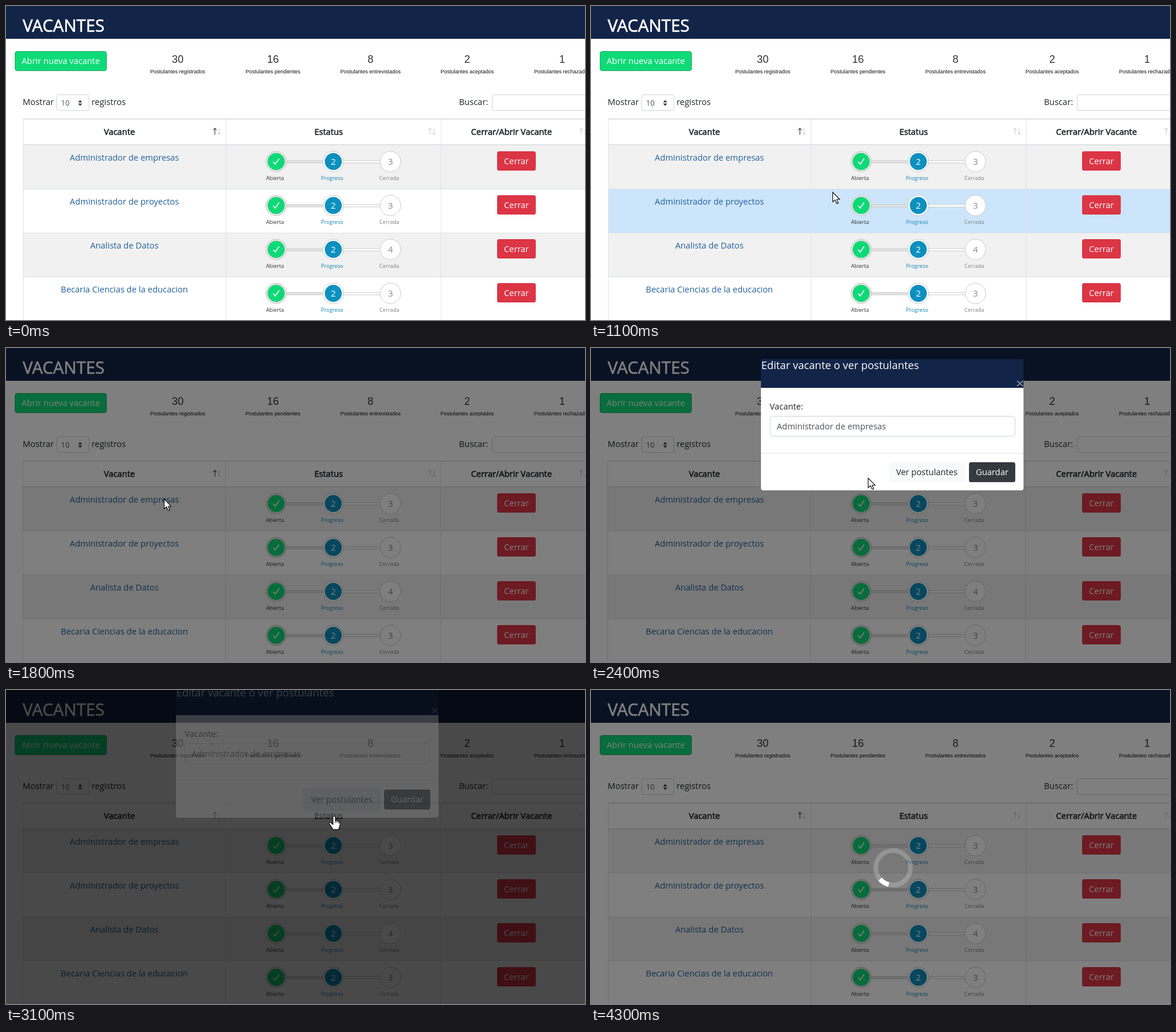
Write an HTML page with a canvas that moves like this. It is 988x536 px and loops after 4.4 s.

```html
<!DOCTYPE html>
<html lang="es">
<head>
<meta charset="utf-8">
<title>Vacantes</title>
<style>
  html, body { margin: 0; width: 100%; height: 100%; overflow: hidden; background: #fff; }
  canvas { display: block; }
</style>
</head>
<body>
<canvas id="stage" width="988" height="536"></canvas>
<script>
const W = 988, H = 536, LOOP = 4400, STEP = 100;
const ctx = document.getElementById('stage').getContext('2d');
const SANS = '"Open Sans", "Noto Sans", sans-serif';
const ARIAL = '"Liberation Sans", Arial, sans-serif';
const NAVY = '#122447', INK = '#212529', LINE = '#dee2e6', FIELD = '#ced4da';

const stats = [
  [293, '30', 'registrados'], [455.5, '16', 'pendientes'], [622, '8', 'entrevistados'],
  [787, '2', 'aceptados'], [949, '1', 'rechazados']
];
const jobs = ['Administrador de empresas', 'Administrador de proyectos',
  'Analista de Datos', 'Becaria Ciencias de la educacion'];

// Pointer path: time, x, y
const path = [[100, 1000, 425], [600, 632, 410], [700, 632, 410], [1400, 270, 258],
  [1850, 270, 258], [2400, 473, 222], [2500, 473, 222], [2900, 560, 215], [3600, 560, 215]];

const clamp = v => Math.max(0, Math.min(1, v));
const ramp = (t, start, length) => clamp((t - start) / length);
const smooth = p => p * p * (3 - 2 * p);

// cubic-bezier(0, 0, .58, 1)
function easeOut(x) {
  let lo = 0, hi = 1;
  for (let i = 0; i < 20; i++) {
    const s = (lo + hi) / 2;
    if (3 * (1 - s) * s * s * 0.58 + s * s * s < x) lo = s; else hi = s;
  }
  return smooth(lo);
}

function rect(x, y, w, h, color) {
  ctx.fillStyle = color;
  ctx.fillRect(x, y, w, h);
}

function box(x, y, w, h, r, fill, border) {
  ctx.beginPath();
  if (border) ctx.roundRect(x + 0.5, y + 0.5, w - 1, h - 1, r);
  else ctx.roundRect(x, y, w, h, r);
  ctx.fillStyle = fill;
  ctx.fill();
  if (border) {
    ctx.strokeStyle = border;
    ctx.lineWidth = 1;
    ctx.stroke();
  }
}

function text(str, x, y, color = INK, size = 14.4, align = 'left', family = SANS, heavy = 0) {
  ctx.font = `${size}px ${family}`;
  ctx.textAlign = align;
  ctx.fillStyle = color;
  ctx.fillText(str, x, y);
  if (heavy) {
    ctx.strokeStyle = color;
    ctx.lineWidth = heavy;
    ctx.strokeText(str, x, y);
  }
}

const centered = (str, x, y, color, size, family, heavy) =>
  text(str, x, y, color, size, 'center', family, heavy);

function poly(points, color, width) {
  ctx.beginPath();
  points.forEach(([x, y]) => ctx.lineTo(x, y));
  ctx.strokeStyle = color;
  ctx.lineWidth = width;
  ctx.stroke();
}

function disc(x, y, r, fill, border) {
  ctx.beginPath();
  ctx.arc(x, y, r, 0, Math.PI * 2);
  ctx.fillStyle = fill;
  ctx.fill();
  if (border) {
    ctx.strokeStyle = border;
    ctx.lineWidth = 1;
    ctx.stroke();
  }
}

function triangle(x, y, h) {
  ctx.beginPath();
  ctx.moveTo(x - 3.5, y);
  ctx.lineTo(x + 3.5, y);
  ctx.lineTo(x, y + h);
  ctx.fillStyle = '#343a40';
  ctx.fill();
}

function sortArrows(x, upColor) {
  const down = '#cfd1d3';
  poly([[x, 208.5], [x, 219.5]], upColor, 1.1);
  poly([[x - 3, 212], [x, 208.5], [x + 3, 212]], upColor, 1.1);
  poly([[x + 7, 209], [x + 7, 219.5]], down, 1.1);
  poly([[x + 4.5, 216.5], [x + 7, 219.5], [x + 9.5, 216.5]], down, 1.1);
}

function steps(y, last) {
  const c = y + 28.5, edge = '#cacaca';
  box(470, c - 2, 80, 5, 0, '#e2e2e2', edge);
  box(566, c - 2, 80, 5, 0, '#fff', edge);

  disc(461, c, 17.5, '#e2e2e2', edge);
  disc(461, c, 14.5, '#0fd977');
  poly([[456, c + 0.5], [459.5, c + 4.5], [466, c - 5]], '#fff', 1.6);

  disc(558.5, c, 17.5, '#fff', edge);
  disc(558.5, c, 14.5, '#0c90bf');
  centered('2', 558.5, c + 5.5, '#fff', 15);

  disc(656, c, 17.5, '#fff', edge);
  centered(last, 656, c + 5.5, '#8a8a8a', 15);

  centered('Abierta', 459, y + 60, '#333', 9.1);
  centered('Progreso', 556.5, y + 60, '#0c83b8', 9.1);
  centered('Cerrada', 654, y + 60, '#808080', 9.1);
}

function drawPage(hover, shift) {
  rect(0, 0, W, H, '#fff');
  rect(0, 0, W, 56, NAVY);
  text('VACANTES', 28.5, 44, '#fff', 28.8, 'left', SANS, 0.7);
  box(15, 77, 157, 34, 3.6, '#0edb78', '#28a760');
  centered('Abrir nueva vacante', 93.5, 99, '#fff');

  stats.forEach(([x, count, label]) => {
    centered(count, x, 97, '#333', 18, ARIAL);
    centered('Postulantes ' + label, x, 115, '#111', 9, ARIAL);
  });

  text('Mostrar', 28.5, 169);
  box(86, 151, 56, 28, 3.6, '#fff', FIELD);
  text('10', 94, 169.5, '#495057', 12.6);
  triangle(126.5, 164.5, -4);
  triangle(126.5, 166.5, 4);
  text('registros', 146, 169);
  text('Buscar:', 773, 169);
  box(829, 151, 180, 28, 3.6, '#fff', FIELD);

  const left = 29 - shift;
  jobs.forEach((job, i) => {
    const y = 237 + 75 * i;
    const fill = i === hover ? '#cce5fb' : i % 2 ? '#fff' : '#f1f1f1';
    rect(left, y, W, 75, fill);
    if (i) rect(left, y, W, 1, LINE);
    centered(job, 202, y + 26.5, '#21609c');
    steps(y, i === 2 ? '4' : '3');
    box(838, y + 11, 66, 33, 3.6, '#dc3545');
    centered('Cerrar', 871, y + 33, '#fff');
  });

  rect(left, 192, W, 2, LINE);
  rect(left, 236, W, 2, LINE);
  [29, 375, 742].forEach(x => rect(x - shift, 193, 1, H, LINE));
  centered('Vacante', 193.5, 220, INK, 14.4, SANS, 0.6);
  centered('Estatus', 550.5, 220, INK, 14.4, SANS, 0.6);
  centered('Cerrar/Abrir Vacante', 862.5, 220, INK, 14.4, SANS, 0.6);
  sortArrows(356.5, '#333');
  sortArrows(723.5, '#cfd1d3');
  sortArrows(981.5, '#cfd1d3');
}

function drawModal(lift, opacity, over, pressed) {
  // Painted on its own layer so that it fades as one piece
  const main = ctx;
  const layer = drawModal.layer || (drawModal.layer = new OffscreenCanvas(W, H).getContext('2d'));
  layer.clearRect(0, 0, W, H);
  withContext(layer, () => {
    ctx.save();
    ctx.translate(0, -lift);
    box(290, 19, 448, 224, 4, '#fff');
    rect(290, 19, 448, 49, NAVY);
    text('Editar vacante o ver postulantes', 290.5, 36, '#fff', 18);
    poly([[727, 56], [737, 65]], '#7c879c', 2);
    poly([[727, 65], [737, 56]], '#7c879c', 2);
    text('Vacante:', 305, 105);
    box(305, 116, 419, 35, 3.6, '#fff', FIELD);
    text('Administrador de empresas', 317, 139, '#495057');
    rect(290, 179, 448, 1, LINE);
    if (pressed) box(506, 192, 134, 40, 6, '#e3e8ee');
    box(509, 195, 128, 34, 3.6, over ? '#e2e6ea' : '#f8f9fa');
    centered('Ver postulantes', 573, 217);
    box(645, 195, 79, 34, 3.6, '#343a40');
    centered('Guardar', 684.5, 217, '#fff');
    ctx.restore();
  });
  main.globalAlpha = opacity;
  main.drawImage(layer.canvas, 0, 0);
  main.globalAlpha = 1;
}

function drawSpinner(t, opacity) {
  const ring = (from, to, color) => {
    ctx.beginPath();
    ctx.arc(515.5, 303.5, 29.5, from, to);
    ctx.strokeStyle = color;
    ctx.lineWidth = 8;
    ctx.stroke();
  };
  const mid = 2.13 + (t - 4300) / 1000 * Math.PI * 2;
  ctx.globalAlpha = opacity;
  ring(0, Math.PI * 2, 'rgba(255,255,255,.2)');
  ring(mid - 0.3, mid + 0.3, '#fff');
  ctx.globalAlpha = 1;
}

const shapes = {
  arrow: new Path2D('M0 0V16.5L4 13L6.6 19H9.4L7 12.2H11.8Z'),
  hand: new Path2D('M-2 1.5Q0-1 2 1.5V8Q4 6.5 5 8.5Q7 7.5 8 9.5Q10 9 10 12V16Q9 19 8 21V23H-3V21Q-6 17-8.5 13Q-8.5 10-5.5 11.5L-2 14.5Z')
};

function drawPointer(x, y, kind) {
  ctx.save();
  ctx.translate(x, y);
  if (kind === 'beam') {
    poly([[-3.5, -8], [-1, -8], [0, -7], [0, 7], [-1, 8], [-3.5, 8]], '#111', 1.2);
    poly([[3.5, -8], [1, -8], [0, -7], [0, 7], [1, 8], [3.5, 8]], '#111', 1.2);
  } else {
    ctx.fillStyle = '#fff';
    ctx.strokeStyle = '#000';
    ctx.lineWidth = 1.1;
    ctx.fill(shapes[kind]);
    ctx.stroke(shapes[kind]);
    if (kind === 'hand') {
      poly([[2, 8], [2, 12]], '#000', 1);
      poly([[5, 9], [5, 12]], '#000', 1);
      poly([[8, 10], [8, 13]], '#000', 1);
    }
  }
  ctx.restore();
}

function pointerAt(t) {
  if (t < path[0][0] || t >= path[path.length - 1][0]) return null;
  const i = path.findIndex(p => p[0] > t);
  const [t0, x0, y0] = path[i - 1], [t1, x1, y1] = path[i];
  const p = smooth((t - t0) / (t1 - t0));
  return { x: x0 + (x1 - x0) * p, y: y0 + (y1 - y0) * p };
}

function pointerKind({ x, y }, t) {
  if (t < 1600) {
    if (x < 296 && y < 270) return 'hand';
    return x > 420 && x < 690 ? 'beam' : 'arrow';
  }
  return t > 2400 && t < 3200 && x > 509 ? 'hand' : 'arrow';
}

function draw(t) {
  const pointer = pointerAt(t);
  const open = t >= 1600 && t < 3400;
  const hover = pointer && t < 1600 && pointer.x < W ? Math.floor((pointer.y - 237) / 75) : -1;
  drawPage(hover, open ? 1 : 0);

  const backdrop = 0.5 * (ramp(t, 1600, 150) - ramp(t, 3310, 150));
  rect(0, 0, W, H, `rgba(0,0,0,${backdrop})`);

  const opacity = ramp(t, 1820, 150) - ramp(t, 3000, 160);
  if (opacity > 0) {
    const lift = t < 3000 ? 50 * (1 - easeOut(ramp(t, 1820, 300))) : 50 * easeOut(ramp(t, 2997, 300));
    const over = pointer && t > 2400 && pointer.x > 509;
    drawModal(lift, opacity, over, t >= 3000);
  }

  const loading = ramp(t, 3015, 100);
  rect(0, 0, W, H, `rgba(0,0,0,${0.5 * loading})`);
  if (t >= 3200) drawSpinner(t, loading);

  if (pointer) drawPointer(pointer.x, pointer.y, pointerKind(pointer, t));
}
</script>
<script>
// Lets the drawing helpers paint on another layer for a moment
function withContext(layer, paint) {
  const calls = ['fillRect', 'beginPath', 'roundRect', 'fill', 'stroke', 'fillText', 'lineTo',
    'save', 'restore', 'translate'];
  const props = ['fillStyle', 'strokeStyle', 'lineWidth', 'font', 'textAlign'];
  calls.forEach(name => { ctx[name] = (...args) => layer[name](...args); });
  props.forEach(name => Object.defineProperty(ctx, name, {
    configurable: true, get: () => layer[name], set: v => { layer[name] = v; }
  }));
  paint();
  calls.concat(props).forEach(name => delete ctx[name]);
}

function tick() {
  const t = performance.now() % LOOP;
  draw(Math.floor(t / STEP) * STEP);
  requestAnimationFrame(tick);
}
tick();
</script>
</body>
</html>
```
